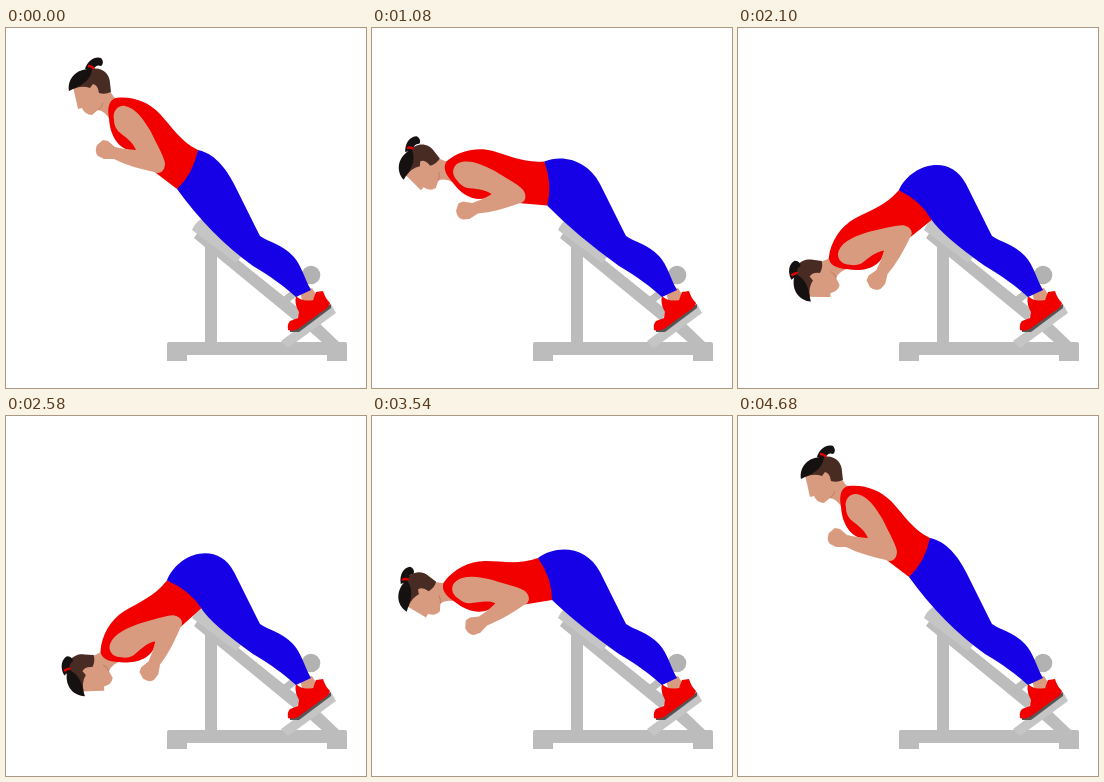
Animation of 360x360 px, one loop 4.71 s. Source, as an HTML page:

```html
<!DOCTYPE html>
<html lang="en">
<head>
<meta charset="utf-8">
<title>Back extension</title>
<style>
html, body { margin: 0; width: 100%; height: 100%; overflow: hidden; background: #fff; }
svg { display: block; width: 100%; height: 100%; }
.steel { fill: #bcbcbc; }
.pad { fill: #c5c5c5; }
.skin { fill: #d99b80; }
.red { fill: #f20000; }
.blue { fill: #1600e6; }
.brown { fill: #482c24; }
.black { fill: #141110; }
</style>
</head>
<body>
<svg viewBox="0 0 360 360">
  <!-- bench -->
  <g class="steel">
    <path d="M199 214H211V316H199Z"/>
    <path d="M301 301L311 293L334 315H317Z"/>
    <path d="M163 314H339Q341 314 341 316V333H321V327H181V333H161V316Q161 314 163 314Z"/>
    <path d="M194 201L296 283L289 293L188 210Z"/>
    <path d="M276 270L296 254L301 260L282 275Z"/>
  </g>
  <path class="pad" d="M195 191L238 223Q235 230 230 235L186 202Q189 195 195 191Z"/>
  <path class="pad" d="M275 313L325 276L330 285L282 320Z"/>

  <!-- foot -->
  <path class="skin" d="M294 264L306 260L311 268L304 274L296 272Z"/>
  <path fill="#555" d="M325 276L325 280L293 304L284 304L284 301Z"/>
  <path class="red" d="M290 268Q296 274 307 272L310 264L317 263Q319 270 324 275Q324 279 314 285L292 301Q286 304 282 302Q281 296 284 293L292 290L293 284Q288 276 290 268Z"/>
  <circle cx="305" cy="247" r="9.3" fill="#b2b2b2"/>

  <g id="upper">
    <path class="skin" d="M67 59L70 72L72 81L76 80Q79 87 86 87L92 82Q99 83 104 92L120 76L108 69L103 62L88 50Z"/>
    <path class="brown" d="M83 42C94 37 104 45 104 55L105 64Q99 67 93 65Q92 57 87 56L84 60Q76 57 67 61Z"/>
    <path class="black" d="M63 63C61 50 71 40 86 41Q85 54 67 61Z"/>
    <g id="ponytail">
      <path class="black" d="M79 41C82 32 89 28 95 30C98 33 97 37 95 38Q90 36 87 42Z"/>
      <path d="M82 38Q86 38 88 41" fill="none" stroke="#e00000" stroke-width="2.5"/>
    </g>
    <path d="M92 82Q96 79 97 75" fill="none" stroke="#c08068"/>
    <path class="red" d="M103 90C101 80 103 72 110 70C126 68 143 74 154 86C166 99 174 113 192 122Q190 149 171 161L150 145L131 122C117 125 104 112 103 90Z"/>
    <path class="skin" d="M108 92C106 82 113 77 119 78C130 80 138 92 145 104C150 115 157 126 159 135C159 143 154 147 148 144C134 141 120 137 108 131L98 131L92 128Q88 124 91 117L97 112L102 113L109 119Q120 122 130 122C127 114 119 109 112 103Q108 98 108 92Z"/>
  </g>
  <path id="pants" class="blue"/>
</svg>
<script>
const PERIOD = 4710;
const HIP = [202, 162];
// [time in ms, forward lean in degrees]
const LEAN = [
  [0, 0], [540, 6.2], [1080, 32], [1620, 63], [2160, 77.5], [2430, 80], [2700, 78],
  [3060, 72.5], [3240, 64.5], [3780, 32], [4020, 15], [4320, 4.2], [PERIOD, 0]
];
const upper = document.getElementById('upper');
const ponytail = document.getElementById('ponytail');
const pants = document.getElementById('pants');

function slope(i) {
  if (i === 0 || i === LEAN.length - 1) return 0;
  const [a, b] = [LEAN[i - 1], LEAN[i + 1]];
  return (b[1] - a[1]) / (b[0] - a[0]);
}

// Cubic Hermite interpolation
function leanAt(time) {
  const i = LEAN.findIndex(key => key[0] > time) - 1;
  const [t0, v0] = LEAN[i], [t1, v1] = LEAN[i + 1];
  const span = t1 - t0, u = (time - t0) / span, w = 1 - u;
  return v0 * w * w * (1 + 2 * u) + v1 * u * u * (1 + 2 * w)
    + span * u * w * (slope(i) * w - slope(i + 1) * u);
}

function turn(x, y, angle) {
  const c = Math.cos(angle), s = Math.sin(angle);
  const dx = x - HIP[0], dy = y - HIP[1];
  return [HIP[0] + dx * c - dy * s, HIP[1] + dx * s + dy * c];
}

function draw(now) {
  const lean = leanAt(now % PERIOD);
  const angle = -lean * Math.PI / 180, p = lean / 80;
  upper.setAttribute('transform', `rotate(${-lean} ${HIP})`);
  // The hair lags behind the head
  ponytail.setAttribute('transform', `rotate(${0.4 * lean} 83 41)`);

  const back = turn(192, 122, angle);
  const waist = turn(187, 146, angle);
  const belly = turn(171, 161, angle);
  const reach = 16 + 14 * p, bulge = 18 + 18 * p;
  const out = [back[0] + reach * Math.cos(angle + 0.19), back[1] + reach * Math.sin(angle + 0.19)];
  const into = [228 - 0.45 * bulge, 156 - 0.89 * bulge];
  pants.setAttribute('d', `M${back}C${out} ${into} 228 156C238 176 246 192 254 208` +
    `C262 214 276 216 287 228C296 238 298 250 305 262L290 269C278 258 264 248 247 238` +
    `Q205 208 ${belly}Q${waist} ${back}Z`);
}

function frame() {
  draw(performance.now());
  requestAnimationFrame(frame);
}
frame();
</script>
</body>
</html>
```
